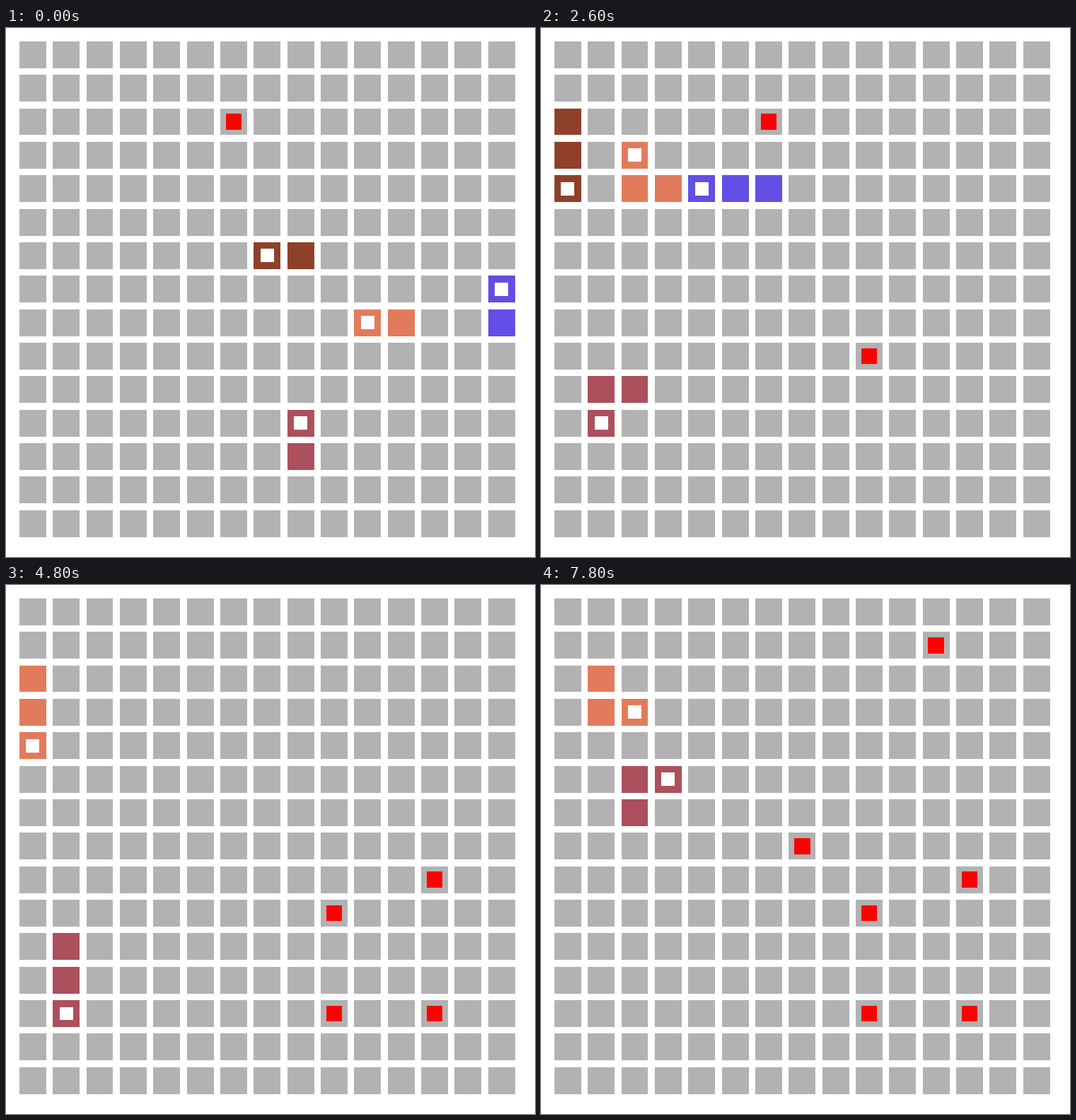
An HTML page with a canvas for the animation above (8000 ms loop, 748 by 748 pixels).

```html
<!DOCTYPE html>
<html lang="en">
<head>
<meta charset="utf-8">
<title>Snakes on a grid</title>
<style>
  html, body { margin: 0; width: 100%; height: 100%; overflow: hidden; background: #fff; }
  canvas { display: block; }
</style>
</head>
<body>
<canvas id="board" width="748" height="748"></canvas>
<script>
const STEP_MS = 200, STEPS = 40, SIZE = 15, UNIT = 748 / 79;
const ctx = document.getElementById('board').getContext('2d');
const DIRS = { L: [-1, 0], R: [1, 0], U: [0, -1], D: [0, 1] };

// Each snake starts at its tail; the first move leads to the opening head cell.
const snakes = [
  { color: '#8f402a', tail: [8, 6], moves: 'LLLLUUULULLLDD' },
  { color: '#624ee5', tail: [14, 8], moves: 'ULLLLLLLULUULLURRDLUURU', ate: 21 },
  { color: '#e27b5c', tail: [11, 8], moves: 'LLLLULLUULLULURURULLLDLDDRRRRULURULLDLDR' },
  { color: '#ab505c', tail: [8, 12], moves: 'ULULULULLDDLLDDRRRULULLDDRRRRUULLLUUUUUR' }
];
for (const snake of snakes) {
  snake.path = [snake.tail];
  for (const move of snake.moves) {
    const [x, y] = snake.path.at(-1), [dx, dy] = DIRS[move];
    snake.path.push([x + dx, y + dy]);
  }
}

const foods = [
  { cell: [6, 2], from: 0, to: 21 },
  { cell: [9, 9], from: 11 },
  { cell: [12, 12], from: 15 },
  { cell: [9, 12], from: 20 },
  { cell: [12, 8], from: 22 },
  { cell: [7, 7], from: 27 },
  { cell: [11, 1], from: 35 }
];

// Square inside a cell, inset in grid units, snapped to whole pixels.
function square([col, row], inset, color) {
  const edge = (i, offset) => Math.round((2 + 5 * i + offset) * UNIT);
  const x = edge(col, inset), y = edge(row, inset);
  ctx.fillStyle = color;
  ctx.fillRect(x, y, edge(col, 4 - inset) - x, edge(row, 4 - inset) - y);
}

function draw(step) {
  ctx.fillStyle = '#fff';
  ctx.fillRect(0, 0, 748, 748);
  for (let row = 0; row < SIZE; row++)
    for (let col = 0; col < SIZE; col++) square([col, row], 0, '#b2b2b2');

  for (const { cell, from, to = STEPS } of foods)
    if (step >= from && step < to) square(cell, 0.8, '#f00');

  for (const { color, path, ate = STEPS } of snakes) {
    const head = step + 1;
    if (head >= path.length) continue;
    const length = step > ate ? 4 : 3;
    path.slice(Math.max(0, head + 1 - length), head + 1)
      .forEach(cell => square(cell, 0, color));
    square(path[head], 1, '#fff');
  }
}

const start = performance.now();
let shown = -1;
function tick() {
  const step = Math.floor((performance.now() - start) / STEP_MS) % STEPS;
  if (step !== shown) draw(shown = step);
  requestAnimationFrame(tick);
}
tick();
</script>
</body>
</html>
```
